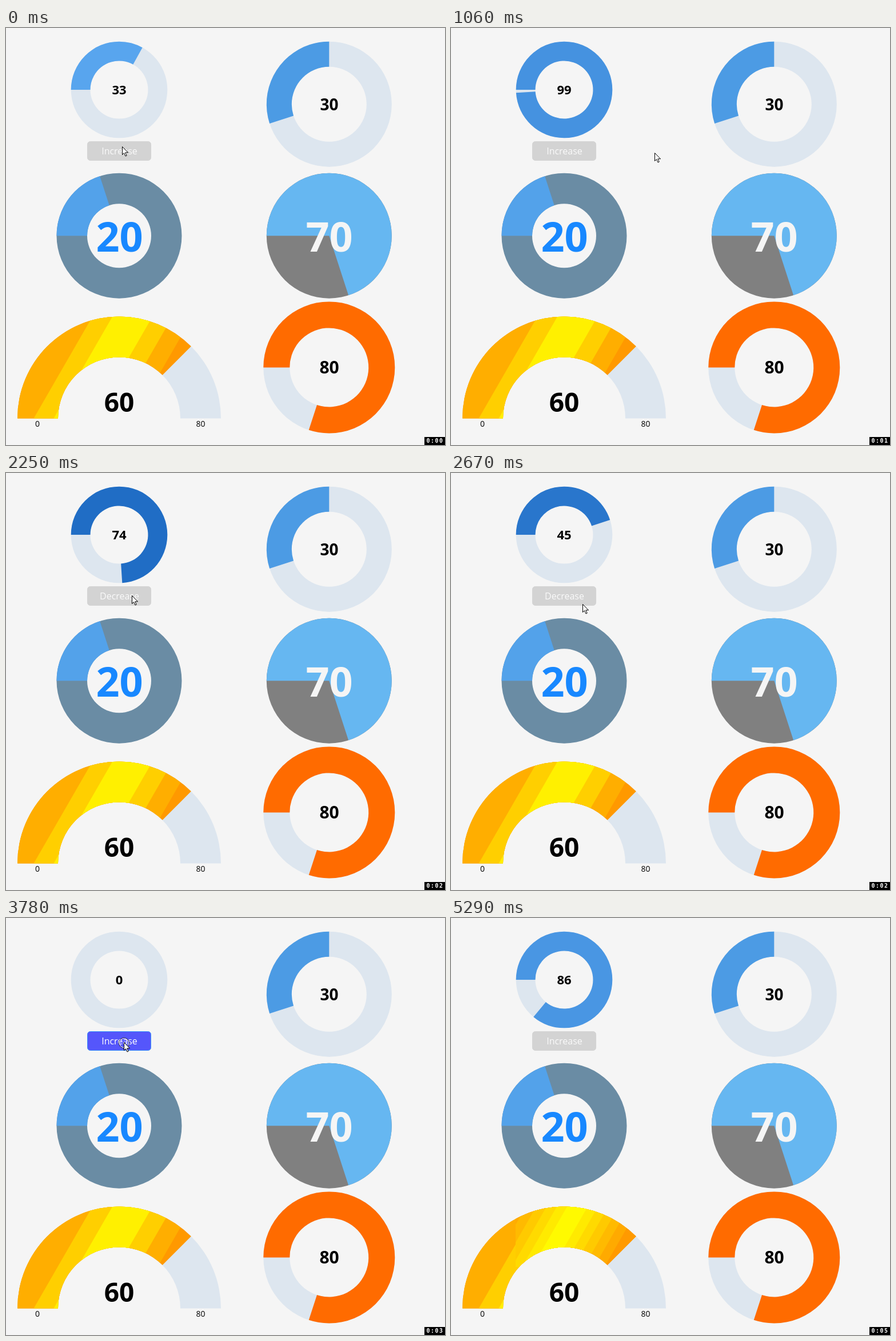
Animation, 768 px wide and 729 px high, one loop 5390 ms. Source, as an HTML page with a canvas:

```html
<!DOCTYPE html>
<html lang="en">
<head>
<meta charset="utf-8">
<title>Gauges</title>
<style>
  html, body { margin: 0; width: 100%; height: 100%; overflow: hidden; background: #f5f5f5; }
  canvas { display: block; }
</style>
</head>
<body>
<canvas id="stage" width="768" height="729"></canvas>
<script>
const ctx = document.getElementById('stage').getContext('2d');
const LOOP = 5390, TAU = Math.PI * 2;
const BACK = '#f5f5f5', TRACK = '#dde6ef';

// Times (ms) at which the button wakes up and is clicked
const FALL = { ready: 1330, click: 1750, start: 1877, speed: 0.069 };
const RISE = { ready: 3470, click: 3920, start: 3908, speed: 0.0622 };
const LEAD = 532; // the loop opens this far into a rise
const POINTER_OUT = 4290;

// Pointer moves: [from, to, x, y]
const HOME = [203, 207];
const MOVES = [[560, 950, 356, 218], [1180, 1450, 220, 214], [2400, 2520, 230, 229],
  [3320, 3630, 206, 217], [3920, 4140, 458, 593]];

const clamp = (v, lo, hi) => Math.min(hi, Math.max(lo, v));

function levelAt(t) {
  const falling = t >= FALL.click && t < RISE.click;
  const raw = falling ? 100 - (t - FALL.start) * FALL.speed
    : (t < FALL.click ? t + LEAD : t - RISE.start) * RISE.speed;
  const value = Math.floor(clamp(raw, 0, 100));
  const red = falling ? 55 - 0.31 * value : 98 - 0.29 * value;
  return { value, color: `rgb(${red},${red + 77},${174 + red * 0.72})` };
}

function pointerAt(t) {
  let [x, y] = HOME;
  for (const [from, to, nextX, nextY] of MOVES) {
    const p = clamp((t - from) / (to - from), 0, 1);
    x += (nextX - x) * p;
    y += (nextY - y) * p;
  }
  return [Math.round(x), Math.round(y)];
}

// Turns are measured clockwise from the left
function ringPath(x, y, outer, inner, from, to) {
  const a = Math.PI + from * TAU, b = Math.PI + to * TAU;
  ctx.beginPath();
  ctx.arc(x, y, outer, a, b);
  ctx.arc(x, y, inner, b, a, true);
  ctx.closePath();
}

function ring(x, y, outer, inner, from, to, color) {
  ringPath(x, y, outer, inner, from, to);
  ctx.fillStyle = color;
  ctx.fill();
}

function gauge(x, y, outer, inner, from, to, color, track = TRACK) {
  ring(x, y, outer, inner, 0, 1, track);
  if (to > from) ring(x, y, outer, inner, from, to, color);
}

function text(s, x, y, size, color = '#000', weight = 700) {
  ctx.font = `${weight} ${size}px "Open Sans", "Noto Sans", sans-serif`;
  ctx.textAlign = 'center';
  ctx.fillStyle = color;
  ctx.fillText(s, x, y);
}

// Slanted bands, stepping from yellow in the middle to orange at the sides
function bands(count, width, green, fade) {
  const mid = 221.5;
  ctx.save();
  ctx.transform(1, 0, -0.577, 1, 0.577 * 504, 0);
  for (let k = count; k >= 0; k--) {
    const right = k < count ? width * (k + 1) : 400;
    const left = k < count - 1 ? right : 400;
    ctx.fillStyle = `rgb(255,${Math.max(153, green - fade * k)},0)`;
    ctx.fillRect(mid - left, 500, left + right, 190);
  }
  ctx.restore();
}

function halfGauge(refined) {
  const shape = [198, 682.4, 178, 107, 0];
  ring(...shape, 0.5, TRACK);
  ctx.save();
  ringPath(...shape, 0.375);
  ctx.clip();
  bands(3, 35, 240, 33);
  if (refined) {
    ctx.beginPath();
    ctx.rect(113, 500, 260, 110);
    ctx.clip();
    bands(6, 18, 250, 16);
  }
  ctx.restore();
  text('60', 198, 671, 46);
  text('0', 55, 697, 14, '#000', 400);
  text('80', 340.5, 697, 14, '#000', 400);
}

function button(t) {
  const enabled = [FALL, RISE].some(run => t >= run.ready && t < run.click);
  const label = t >= FALL.ready && t < RISE.ready ? 'Decrease' : 'Increase';
  ctx.beginPath();
  ctx.roundRect(142.5, 198.5, 111, 33, 5);
  ctx.fillStyle = enabled ? '#5556fb' : '#d3d3d3';
  ctx.strokeStyle = enabled ? '#3c94fb' : '#d3d3d3';
  ctx.lineWidth = 1;
  ctx.fill();
  ctx.stroke();
  text(label, 198.5, 221, 16, enabled ? '#fff' : '#fafafa', 400);
}

function circle(x, y, r, color) {
  ctx.beginPath();
  ctx.arc(x, y, r, 0, TAU);
  ctx.strokeStyle = color;
  ctx.stroke();
}

function pointer(t) {
  if (t >= POINTER_OUT) return;
  const arrow = new Path2D('M0 0V14L3 11L5.5 16.5L7.7 15.5L5.3 10.3H10Z');
  const [x, y] = pointerAt(t);
  ctx.save();
  ctx.translate(x + 0.5, y + 0.5);
  ctx.lineWidth = 1;
  if ([FALL, RISE].some(run => t >= run.click - 140 && t < run.click)) {
    circle(0, 1, 9, '#223');
    circle(0, 1, 8, '#fff');
  }
  ctx.fillStyle = '#fff';
  ctx.strokeStyle = '#000';
  ctx.fill(arrow);
  ctx.stroke(arrow);
  ctx.restore();
}

function clock(t) {
  ctx.fillStyle = '#000';
  ctx.fillRect(732, 715, 36, 14);
  ctx.fillStyle = '#fff';
  ctx.font = '700 10px "DejaVu Sans Mono", monospace';
  ctx.textAlign = 'center';
  [...'0:0' + Math.floor(t / 1000)].forEach((c, i) => ctx.fillText(c, 738.5 + i * 7.5, 725));
}

function draw(t) {
  ctx.fillStyle = BACK;
  ctx.fillRect(0, 0, 768, 729);

  const { value, color } = levelAt(t);
  gauge(198, 108, 84.3, 50.5, 0, value / 100, color);
  text(value, 198, 116, 22);

  gauge(565.3, 133.2, 109.5, 65.5, -0.05, 0.25, '#4c9be4');
  text('30', 565.5, 144, 28);

  gauge(198, 363.2, 109.5, 56, 0, 0.2, '#53a2ea', '#6a8ca4');
  text('20', 198.5, 391, 72, '#1888ff');

  gauge(565.3, 363.2, 109.5, 0, 0, 0.7, '#66b7f1', '#808080');
  text('70', 565.5, 391, 72, BACK);

  gauge(565.3, 593.4, 115, 69, 0, 0.8, '#ff6b00');
  text('80', 565.5, 604, 30);

  halfGauge(t >= POINTER_OUT);
  button(t);
  pointer(t);
  clock(t);
}

const start = performance.now();
function frame() {
  draw((performance.now() - start) % LOOP);
  requestAnimationFrame(frame);
}
frame();
</script>
</body>
</html>
```
